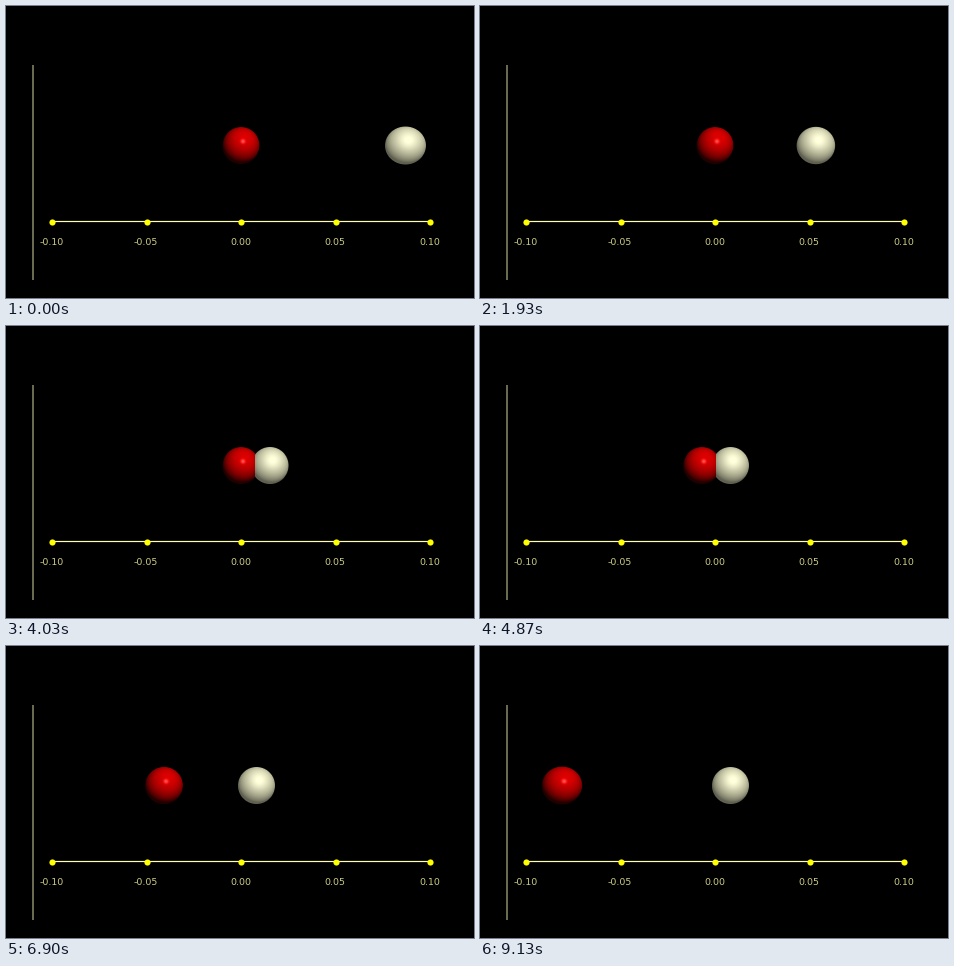
Write a matplotlib script that moves like this. It is 468x292 px and loops after 9910 ms.

```python
import numpy as np
import matplotlib.pyplot as plt
from matplotlib.animation import FuncAnimation

W, H, DPI = 468, 292, 64
PX = 72 / DPI                      # one pixel in points
FRAMES, TICK = 583, 17             # 9.91 s per loop
MID, BALL_Y, AXIS_Y = 235, 139.5, 215.5
TOP, BOTTOM = 116, 164             # band in which the balls travel

# Runs of equal steps: (start ms, end ms, steps, first x, last x).
# The ball rests between runs.
CUE = [
    (0, 0, 1, 399.5, 399.5),
    (70, 270, 6, 398.7, 394.8),
    (630, 1430, 18, 374, 347.7),
    (1630, 2230, 16, 347, 323.2),
    (2370, 2670, 8, 322, 312),
    (2830, 2830, 1, 299.5, 299.5),
    (2970, 3870, 22, 298, 266),
    (4030, 4420, 10, 264, 250.5),
]
RED = [
    (0, 0, 1, MID, MID),
    (4460, 5730, 33, 234, 195),
    (5900, 6130, 7, 193.5, 183),
    (6300, 6530, 7, 181.5, 168.5),
    (6700, 6700, 1, 158, 158),
    (6900, 7330, 14, 155, 142),
    (7500, 8470, 26, 142, 105),
    (8500, 8800, 8, 104, 91.5),
    (9000, 9130, 3, 84, 82),
]


def unit(v):
    v = np.array(v, float)
    return v / np.linalg.norm(v)


LIGHT = unit((0.21, 0.44, 0.88))
HALF = unit(LIGHT + (0, 0, 1))
X, Y = np.meshgrid(np.arange(W) + 0.5, np.arange(TOP, BOTTOM) + 0.5)

# colour, ambient, diffuse, gloss, shininess
CUE_LOOK = (np.array([1, 1, 0.84]), 0.38, 0.53, 0.12, 10)
RED_LOOK = (np.array([1, 0, 0]), 0.13, 0.74, 0.32, 150)


def position(runs, t):
    t0, t1, n, x0, x1 = [r for r in runs if r[0] <= t][-1]
    if t >= t1:
        return x1
    k = int((t - t0) / (t1 - t0) * (n - 1))
    return x0 + (x1 - x0) * k / (n - 1)


def ball(x, look):
    """Shaded colour and depth of a lit sphere over the band."""
    color, ambient, diffuse, gloss, shine = look
    off = ((x - MID) / 165) ** 2   # perspective widens it off centre
    rx, ry = 18.5 + 2 * off, 18.5 + 0.5 * off
    nx, ny = (X - x) / rx, (BALL_Y - Y) / ry
    r = np.hypot(nx, ny)
    nz = np.sqrt(np.clip(1 - r * r, 0, 1))
    lit = np.clip(nx * LIGHT[0] + ny * LIGHT[1] + nz * LIGHT[2], 0, 1)
    spec = np.clip(nx * HALF[0] + ny * HALF[1] + nz * HALF[2], 0, 1) ** shine
    rgb = (ambient + diffuse * lit)[..., None] * color + gloss * spec[..., None]
    cover = np.clip((1 - r) * rx + 0.5, 0, 1)
    return np.clip(rgb, 0, 1) * cover[..., None], nz * rx + cover


def scene(t):
    cue, cue_z = ball(position(CUE, t), CUE_LOOK)
    red, red_z = ball(position(RED, t), RED_LOOK)
    return np.where((cue_z > red_z)[..., None], cue, red)


fig = plt.figure(figsize=(W / DPI, H / DPI), dpi=DPI, facecolor="black")
ax = fig.add_axes([0, 0, 1, 1])
band = ax.imshow(scene(0), extent=(0, W, BOTTOM, TOP), aspect="auto",
                 interpolation="nearest", zorder=0)
ax.set(xlim=(0, W), ylim=(H, 0))
ax.axis("off")

ax.plot([27, 27], [59, 274], color="#a4a47c", lw=1.3 * PX,
        solid_capstyle="butt", snap=False)
ticks = np.linspace(46, 424, 5)
ax.plot(ticks[[0, -1]], [AXIS_Y] * 2, color="#ffffb4", lw=1.2 * PX, snap=False)
ax.plot(ticks, [AXIS_Y] * 5, "o", color="#ffff00", ms=6.2 * PX, mew=0)
for x, value in zip(ticks, np.linspace(-0.1, 0.1, 5)):
    ax.text(x - 0.5, 239, f"{value:.2f}", color="#cccc84", ha="center",
            va="baseline", family="DejaVu Sans", size=9.4 * PX)


def update(i):
    band.set_data(scene(i * TICK + TICK // 2))
    return [band]


anim = FuncAnimation(fig, update, frames=FRAMES, interval=TICK,
                     repeat=True, repeat_delay=0)
plt.show()
```
